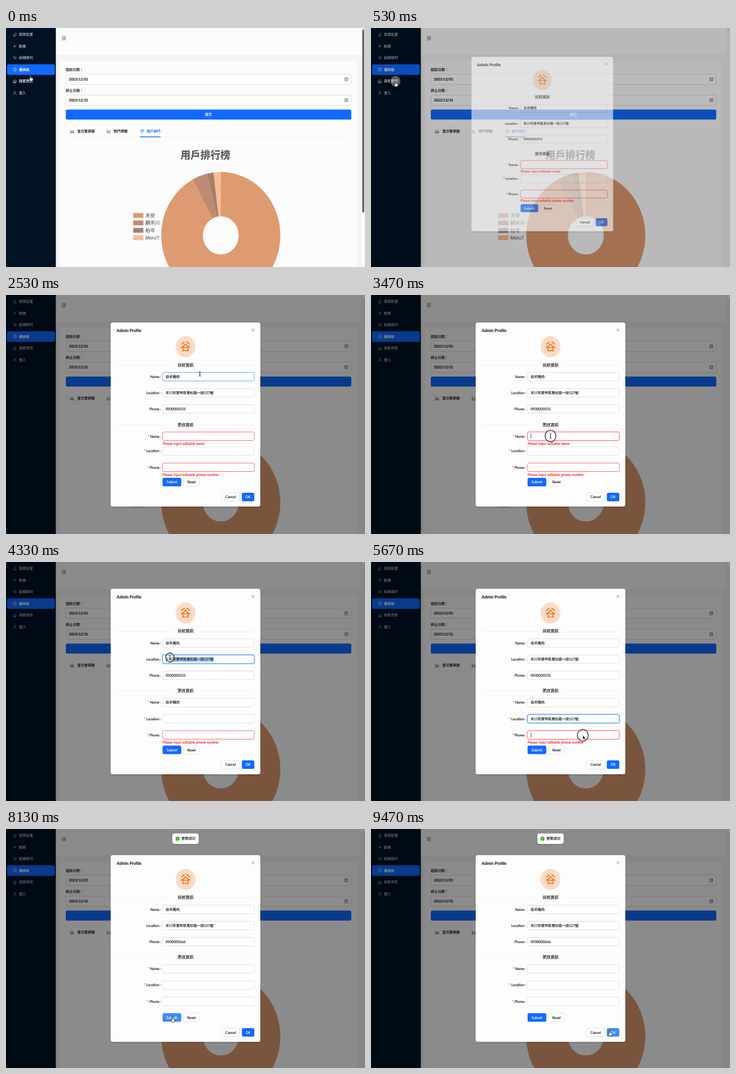
These frames come from a looping animation (600x400 px, 9540 ms). An HTML page:

```html
<!DOCTYPE html>
<html lang="zh-Hant">
<head>
<meta charset="utf-8">
<title>Admin Profile</title>
<style>
html, body { margin: 0; width: 100%; height: 100%; overflow: hidden; background: #f5f5f5; }
svg { display: block; width: 100vw; height: 100vh; }
text { font-family: Lato, "Noto Sans CJK TC", "Noto Sans CJK JP", sans-serif; text-rendering: geometricPrecision; white-space: pre; }
.chart { font-family: "Liberation Sans", "Noto Sans CJK TC", "Noto Sans CJK JP", sans-serif; }
.icon { fill: none; stroke-width: 1.5; }
</style>
</head>
<body>
<svg viewBox="0 0 1440 900" preserveAspectRatio="none">
  <g id="page"></g>
  <rect id="mask" width="1440" height="900"/>
  <circle cx="1434" cy="7" r="4" fill="#e8873c"/>
  <g id="modal"></g>
  <g id="toast"></g>
  <g id="cursor"></g>
</svg>
<script>
const LOOP = 9540, BLUE = '#1169ff', RED = '#ff4d4f', INK = '#1f1f1f';
const SHOP = '谷禾燒肉', PLACE = '禾川市東岑區青杉路一段527號';
const OLD_PHONE = '0900000555', NEW_PHONE = '0900000666';
const $ = id => document.getElementById(id);

// Drawing helpers in 1440 x 900 screen units
const rect = (x, y, w, h, fill, r = 0, more = '') =>
  `<rect x="${x}" y="${y}" width="${w}" height="${h}" fill="${fill}" rx="${r}" ${more}/>`;
const text = (x, cy, s, { size = 14, fill = INK, at = 'start', weight = 400, cls = '' } = {}) =>
  `<text x="${x}" y="${cy + size * .36}" font-size="${size}" fill="${fill}" stroke="${fill}" stroke-width=".35"
    text-anchor="${at}" font-weight="${weight}" class="${cls}">${s}</text>`;
const icon = (x, y, d, color) =>
  `<path class="icon" transform="translate(${x} ${y})" d="${d}" stroke="${color}"/>`;
const button = (x, cy, w, label, fill) => {
  const plain = !fill;
  return rect(x, cy - 16, w, 32, fill || '#fff', 6, plain ? 'stroke="#d9d9d9" stroke-width="1.6"' : '') +
    text(x + w / 2, cy, label, { at: 'middle', fill: plain ? INK : '#fff' });
};

const ICONS = {
  edit: 'M-5 6H6M-4 2L3-6L6-3L-1 4L-5 4Z',
  plus: 'M-6 0H6M0-6V6',
  cart: 'M-7-6H-4L-2 3H5L6-3H-3M-1 6h1M4 6h1',
  gauge: 'M-4 5A6.5 6.5 0 1 1 4 5ZM0 1L3-3',
  home: 'M-7 0L0-6L7 0M-5-1V6H5V-1M-1 6V2H1V6',
  user: 'M-3-3A3 3 0 1 0 3-3A3 3 0 1 0-3-3M-6 7C-6 0 6 0 6 7',
  bars: 'M-7-6V6H7M-3 4V0M1 4V-4M5 4V-2',
  line: 'M-7-6V6H7M-4 2L-1-2L2 1L6-4',
  pie: 'M0-6A6 6 0 1 0 6 0H0ZM3-7A5 5 0 0 1 7-3H3Z',
  date: 'M-6-5H6V6H-6ZM-6-1H6M-3-7V-4M3-7V-4M-2 3H3',
  fold: 'M-8-6.5H8M-1-2H8M-1 2H8M-8 6.5H8M-7 0L-4-2V2Z'
};

function drawPage() {
  const menu = [['edit', '菜單設置'], ['plus', '點餐'], ['cart', '結帳隊列'],
    ['gauge', '儀表板'], ['home', '商家資訊'], ['user', '登入']];
  const items = menu.map(([name, label], i) => {
    const y = 24.5 + 44 * i, color = i === 3 ? '#fff' : '#a6adb4';
    return `<g id="item${i}">${i === 3 ? rect(4, y - 20, 192, 40, BLUE, 8) : ''}` +
      icon(35, y, ICONS[name], color) + text(52, y, label, { fill: color }) + '</g>';
  }).join('');

  const dates = [['起始日期：', '2023/12/01', 157.5], ['終止日期：', '2023/12/31', 236.5]]
    .map(([label, day, y]) => text(240, y, label) +
      rect(240, y + 16, 1145, 39, '#fff', 6, 'stroke="#d9d9d9" stroke-width="2"') +
      text(252, y + 35.5, day, { weight: 700 }) + icon(1365, y + 35.5, ICONS.date, '#555')).join('');

  const tabs = [['bars', '當日營業額', 266, 286], ['line', '熱門標籤', 413, 432], ['pie', '用戶排行', 545, 564]]
    .map(([name, label, ix, tx], i) => {
      const color = i === 2 ? BLUE : INK;
      return icon(ix, 389, ICONS[name], color) + text(tx, 389, label, { fill: color, weight: 500 });
    }).join('');

  const users = [['禾安', '#de9a70', 0, 332.5], ['顧禾川', '#bd8a72', 332.5, 346.6],
    ['柏岑', '#a98068', 346.6, 353.1], ['MoruT', '#f6bd96', 353.1, 360]];
  const chart = users.map(([name, color, from, to], i) =>
    `<circle cx="861.6" cy="781" r="155.4" fill="none" stroke="${color}" stroke-width="167" pathLength="360"
      stroke-dasharray="${to - from} 360" transform="rotate(${from - 90} 861.6 781)"/>` +
    rect(510, 697 + 28 * i, 41, 18, color) +
    text(559, 706 + 28 * i, name, { size: 19.2, fill: '#666', cls: 'chart' })).join('');

  $('page').innerHTML = rect(0, 0, 1440, 900, '#f4f4f4') + rect(200, 0, 1225, 100, '#fcfcfc') +
    rect(216, 124, 1193, 800, '#fcfcfc', 8) + rect(0, 0, 200, 900, '#001224') + items +
    icon(232, 38, ICONS.fold, '#333') + dates +
    rect(240, 307, 1145, 38, BLUE, 6) + text(812, 326, '提交', { fill: '#fff', at: 'middle' }) +
    tabs + rect(260, 410, 1105, 1.5, '#eee') + rect(538, 408.5, 82, 3, BLUE) +
    text(800, 479, '用戶排行榜', { size: 40, weight: 700, fill: '#555', at: 'middle', cls: 'chart' }) + chart +
    `<g id="bar">${rect(1425, 0, 15, 900, '#fafafa')}${rect(1429, 5, 8, 690, '#606060', 4)}</g>`;
}

// Timing helpers
const clamp = v => Math.min(1, Math.max(0, v));
const ramp = (t, start, span) => clamp((t - start) / span);
const easeOut = p => 1 - (1 - p) ** 3;
const smooth = p => p * p * (3 - 2 * p);
const within = (t, a, b) => t >= a && t < b;

const pen = document.createElement('canvas').getContext('2d');
function widthOf(s) {
  pen.font = '14px Lato, "Noto Sans CJK TC", "Noto Sans CJK JP", sans-serif';
  return pen.measureText(s).width;
}

function field(cy, label, value, o = {}) {
  const tone = o.error ? RED : o.focus ? BLUE : o.hover ? '#4096ff' : '#d9d9d9';
  const ring = o.focus ? rect(626, cy - 18, 372, 36, 'none', 8,
    `stroke="${tone}" stroke-opacity=".16" stroke-width="4"`) : '';
  const star = o.required ? `<tspan fill="${RED}" stroke="${RED}">*</tspan> ` : '';
  const end = 640 + widthOf(value);
  let out = text(620, cy, `${star}${label}<tspan dx="2">:</tspan>`, { at: 'end' }) + ring +
    rect(628, cy - 16, 368, 32, o.filled ? '#e8f0fe' : '#fff', 6, `stroke="${tone}" stroke-width="1.8"`);
  if (o.select !== undefined && o.select < end)
    out += rect(o.select, cy - 9, end - o.select, 19, '#a9cdf8');
  out += text(640, cy, value);
  if (o.caret) out += rect(end + .5, cy - 9, 1.8, 18, '#222');
  if (o.help > 0) out += `<g opacity="${o.help}">` +
    text(628, cy + 27, `Please input editable ${o.helpFor}`, { size: 14.3, fill: '#f5222d' }) + '</g>';
  return out;
}

const section = (y, label) => rect(444, y, 222, 1.5, '#ececec') + rect(774, y, 222, 1.5, '#ececec') +
  text(720, y, label, { size: 16, weight: 500, at: 'middle' });

const SAVED = 7850, NAME_AT = 3540, PLACE_AT = 5060, PHONE_AT = 6470;

function drawModal(t, mouseX) {
  const open = ramp(t, 400, 220);
  $('mask').setAttribute('opacity', .45 * open);
  $('bar').setAttribute('visibility', t < 400 ? 'visible' : 'hidden');
  if (!open) return $('modal').innerHTML = '';

  const errName = 1 - easeOut(ramp(t, NAME_AT, 200)), errPhone = 1 - easeOut(ramp(t, PHONE_AT, 200));
  const height = 703.5 - 5 * (errName + errPhone), top = 450 - height / 2;
  const nameY = top + 428.5, placeY = nameY + 61 - 5 * errName, phoneY = placeY + 61;
  const submitY = phoneY + 61 - 5 * errPhone, footY = submitY + 56;
  const typed = (s, at) => within(t, at, SAVED) ? s : '';
  const blink = start => (t - start) % 1000 < 500;
  const edge = (start, stop) => within(t, start, stop) ? Math.max(640, mouseX) : undefined;
  const onName = within(t, 3450, 4000), onPlace = within(t, 4950, 5700), onPhone = within(t, 5640, 7600);

  $('modal').innerHTML =
    rect(420, top + 6, 600, height, '#000', 10, 'opacity=".1"') + rect(420, top, 600, height, '#fdfdfd', 8) +
    text(444, top + 31, 'Admin Profile', { size: 16.4, weight: 700 }) +
    icon(991, top + 29, 'M-5.5-5.5L5.5 5.5M5.5-5.5L-5.5 5.5', '#666') +
    `<circle cx="720" cy="${top + 91.5}" r="40" fill="#fadcc6"/>` +
    text(720, top + 92, SHOP[0], { size: 42, fill: '#f56a00', at: 'middle' }) +
    section(top + 160, '目前資訊') +
    field(top + 204.5, 'Name', SHOP, { hover: within(t, 2130, 2700), focus: within(t, 2700, 3450), select: edge(2700, 3450) }) +
    field(top + 265.5, 'Location', PLACE, { focus: within(t, 4000, 4950), select: edge(4000, 4950) }) +
    field(top + 326, 'Phone', t < SAVED ? OLD_PHONE : NEW_PHONE) +
    section(top + 385, '更改資訊') +
    field(nameY, 'Name', typed(SHOP, NAME_AT), { required: true, error: t < NAME_AT, help: errName,
      helpFor: 'name', focus: onName, caret: onName && blink(3450) }) +
    field(placeY, 'Location', typed(PLACE, PLACE_AT), { required: true, focus: onPlace,
      caret: within(t, 4950, 5640) && blink(4950) }) +
    field(phoneY, 'Phone', typed(NEW_PHONE, PHONE_AT), { required: true, error: t < PHONE_AT, help: errPhone,
      helpFor: 'phone number', focus: onPhone, caret: onPhone && blink(5640), filled: within(t, PHONE_AT, SAVED) }) +
    button(628, submitY, 75, 'Submit', within(t, 7480, 8450) ? '#4088f8' : BLUE) +
    button(711, submitY, 66, 'Reset') +
    button(864, footY, 74, 'Cancel') + button(946, footY, 50, 'OK', t > 9050 ? '#4088f8' : BLUE);

  // Grows out of the clicked menu item
  const k = .2 + .8 * easeOut(open);
  $('modal').setAttribute('transform', `translate(${98 * (1 - k)} ${205 * (1 - k)}) scale(${k})`);
  $('modal').setAttribute('opacity', open);
}

function drawToast(t) {
  const p = easeOut(ramp(t, SAVED, 250));
  $('toast').setAttribute('opacity', p);
  $('toast').setAttribute('transform', `translate(0 ${-40 * (1 - p)})`);
}

// Pointer path in stage pixels: time, x, y, shape until the next entry
const PATH = [
  [0, 41, 79.5, 'hand'], [70, 41, 79.5, 'hand'], [200, 41, 89, 'hand'], [740, 41, 89, 'arrow'],
  [1330, 250, 125, 'arrow'], [1400, 250, 125, 'arrow'], [2130, 322, 131, 'beam'], [2530, 324, 132, 'beam'],
  [2700, 292, 136, 'beam'], [3000, 264, 136, 'beam'], [3100, 264, 136, 'beam'], [3400, 300, 236, 'beam'],
  [3650, 300, 236, 'beam'], [3980, 349, 161, 'beam'], [4330, 274, 160, 'beam'], [4450, 266, 160, 'beam'],
  [4600, 266, 160, 'beam'], [4900, 330, 262, 'beam'], [5150, 330, 262, 'beam'], [5560, 354, 290, 'arrow'],
  [5760, 354, 290, 'beam'], [6330, 350, 292, 'beam'], [6800, 344, 248, 'beam'], [7330, 300, 296, 'arrow'],
  [7480, 278, 314, 'hand'], [8400, 278, 314, 'arrow'], [9050, 397, 335, 'hand'], [9270, 397, 335, 'hand'],
  [9470, 399, 337, 'hand'], [LOOP, 399, 337, 'hand']
];
const PRESSES = [[400, 540], [2700, 3020], [3430, 3540], [4000, 4470], [4930, 5040], [5600, 5760], [7600, 7720]];
const SHAPES = {
  hand: '<path d="M-2 1Q0-1 2 1V8L9 10Q11 11 10 14L8 21H-2L-7 13Q-6 10-2 13Z" fill="#fff" stroke="#000" stroke-width="1.6"/>',
  arrow: '<path d="M0 0V15L3.5 12L6 18L9 17L6.5 11H11Z" fill="#000" stroke="#fff" stroke-width="1.2"/>',
  beam: '<path d="M-4-9Q0-9 0-6Q0-9 4-9M0-6V6M-4 9Q0 9 0 6Q0 9 4 9M-2 3H2" fill="none" stroke="#222" stroke-width="2"/>'
};

function pointer(t) {
  const i = PATH.findIndex((k, n) => t < PATH[n + 1][0]);
  const [t0, x0, y0, shape] = PATH[i], [t1, x1, y1] = PATH[i + 1];
  const p = smooth((t - t0) / (t1 - t0));
  return { x: (x0 + (x1 - x0) * p) * 2.4, y: (y0 + (y1 - y0) * p) * 2.25, shape };
}

function drawCursor(t, { x, y, shape }) {
  const press = PRESSES.find(([a, b]) => within(t, a, b));
  const ring = press ? `<circle r="${22 - 5 * ramp(t, press[0] + 80, 240)}" fill="#fff" fill-opacity=".35"
    stroke="#111" stroke-width="2.6"/>` : '';
  $('cursor').innerHTML = ring + SHAPES[shape];
  $('cursor').setAttribute('transform', `translate(${x} ${y})`);
}

function draw(now) {
  const t = now % LOOP, mouse = pointer(t);
  const bright = t < 800;
  $('item4').setAttribute('style', bright ? 'filter:brightness(1.5)' : '');
  drawModal(t, mouse.x);
  drawToast(t);
  drawCursor(t, mouse);
  requestAnimationFrame(next);
}

drawPage();
$('toast').innerHTML = rect(664, 21, 112, 39, '#000', 9, 'opacity=".12"') + rect(667, 17, 106, 39, '#fff', 8) +
  '<circle cx="688" cy="36.5" r="8" fill="#49a51d"/>' + icon(688, 36.5, 'M-4 0L-1 3L4-3', '#fff') +
  text(704, 36.5, '更新成功');
const start = performance.now();
const next = () => draw(performance.now() - start);
next();
</script>
</body>
</html>
```
